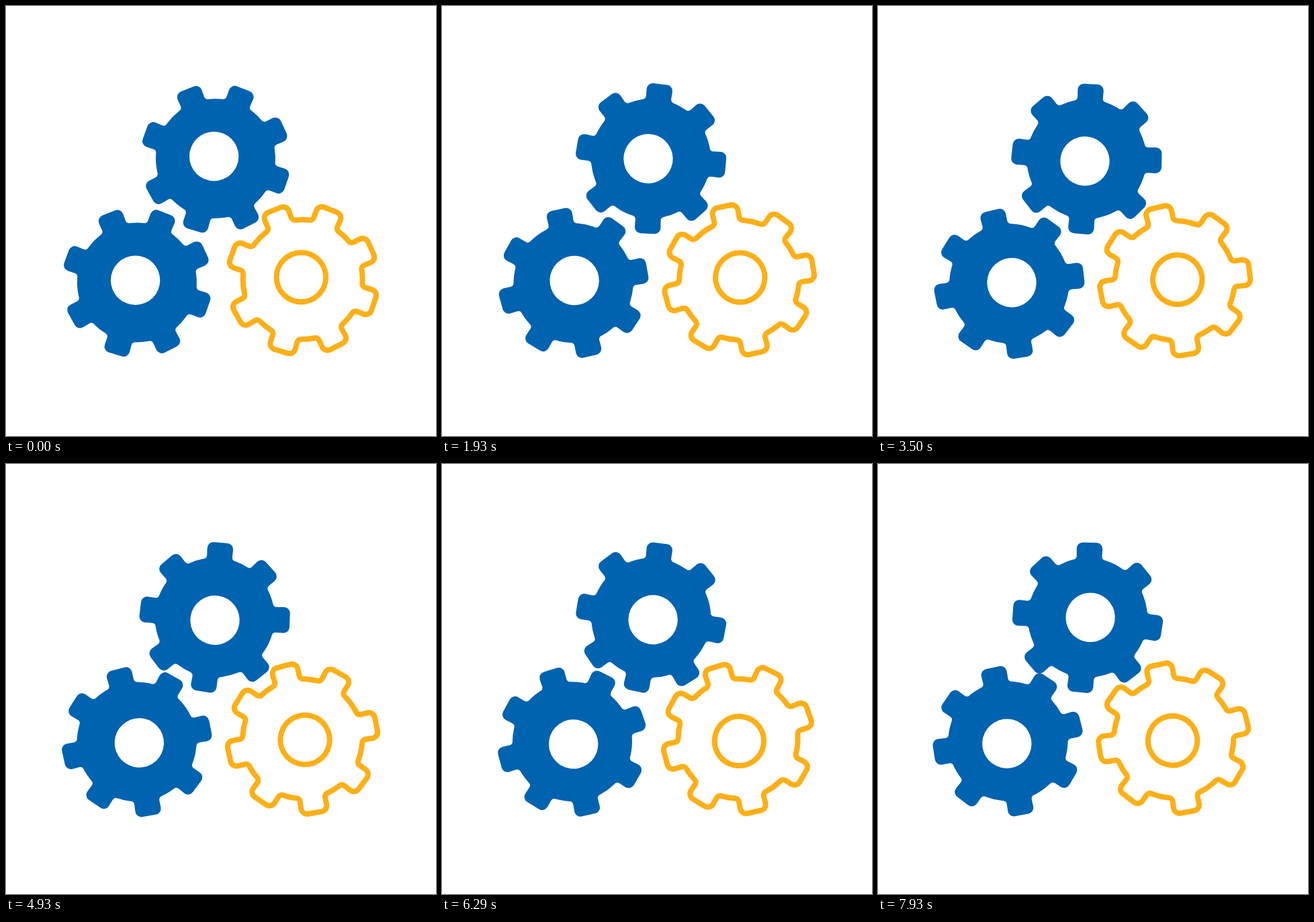
Write an HTML page with a canvas that moves like this. It is 640 px wide and 640 px high and loops after 8000 ms.

```html
<!DOCTYPE html>
<html lang="en">
<head>
<meta charset="utf-8">
<title>Turning gears</title>
<style>
  html, body { margin: 0; width: 100%; height: 100%; overflow: hidden; background: #fff; }
  canvas { display: block; width: 640px; height: 640px; }
</style>
</head>
<body>
<canvas id="stage" width="640" height="640"></canvas>
<script>
const ctx = document.getElementById('stage').getContext('2d');

const LOOP = 8000;
const STEPS = 112;
const STEP_ANGLE = 2 * Math.PI / 167;
const BLUE = '#0063af';
const AMBER = '#fcaf17';

// Tooth directions in degrees, clockwise from straight up.
const TEETH = [-22.1, 21.8, 65.4, 109, 153.3, 196.7, 240.9, 290.2];
const BODY_RADIUS = 89;
const TIP_RADIUS = 111.7;
const VALLEY_MARGIN = 0.285;

const gears = [
  { x: 311.5, y: 227.9, direction: -1, color: BLUE },
  { x: 194.5, y: 412.4, direction: 1, color: BLUE },
  { x: 441.2, y: 407.9, direction: 1, color: AMBER, outlined: true }
];

const radians = degrees => degrees * Math.PI / 180;

// A point given in the frame of a tooth pointing along the angle.
function toothPoint(angle, across, out) {
  const c = Math.cos(angle), s = Math.sin(angle);
  return [across * c + out * s, across * s - out * c];
}

function buildGear() {
  const path = new Path2D();
  const onBody = angle => toothPoint(angle, 0, BODY_RADIUS);
  path.moveTo(...onBody(radians(TEETH[0]) - VALLEY_MARGIN));
  TEETH.forEach((degrees, i) => {
    const angle = radians(degrees);
    const next = radians(TEETH[i + 1] ?? TEETH[0] + 360);
    const baseLeft = toothPoint(angle, -18.7, 87);
    const tipLeft = toothPoint(angle, -19.6, TIP_RADIUS);
    const tipRight = toothPoint(angle, 19.6, TIP_RADIUS);
    const baseRight = toothPoint(angle, 18.7, 87);
    path.arcTo(...baseLeft, ...tipLeft, 6);
    path.arcTo(...tipLeft, ...tipRight, 9);
    path.arcTo(...tipRight, ...baseRight, 9);
    path.arcTo(...baseRight, ...onBody(angle + VALLEY_MARGIN), 6);
    path.arc(0, 0, BODY_RADIUS,
      angle + VALLEY_MARGIN - Math.PI / 2, next - VALLEY_MARGIN - Math.PI / 2);
  });
  path.closePath();
  path.moveTo(34.4, -3.3);
  path.arc(-2.3, -3.3, 36.7, 0, 2 * Math.PI);
  path.closePath();
  return path;
}

const gearPath = buildGear();

function drawGear({ x, y, direction, color, outlined }, turn) {
  ctx.save();
  ctx.translate(x, y);
  ctx.rotate(direction * turn);
  ctx.translate(0.4, -0.9); // the body sits slightly off its axle
  if (outlined) {
    ctx.strokeStyle = color;
    ctx.lineWidth = 8;
    ctx.lineJoin = 'round';
    ctx.stroke(gearPath);
  } else {
    ctx.fillStyle = color;
    ctx.fill(gearPath, 'evenodd');
  }
  ctx.restore();
}

function render() {
  const time = performance.now() % LOOP;
  const step = Math.floor(time / LOOP * STEPS + 0.1) % STEPS;
  ctx.clearRect(0, 0, 640, 640);
  gears.forEach(gear => drawGear(gear, step * STEP_ANGLE));
  requestAnimationFrame(render);
}
render();
</script>
</body>
</html>
```
